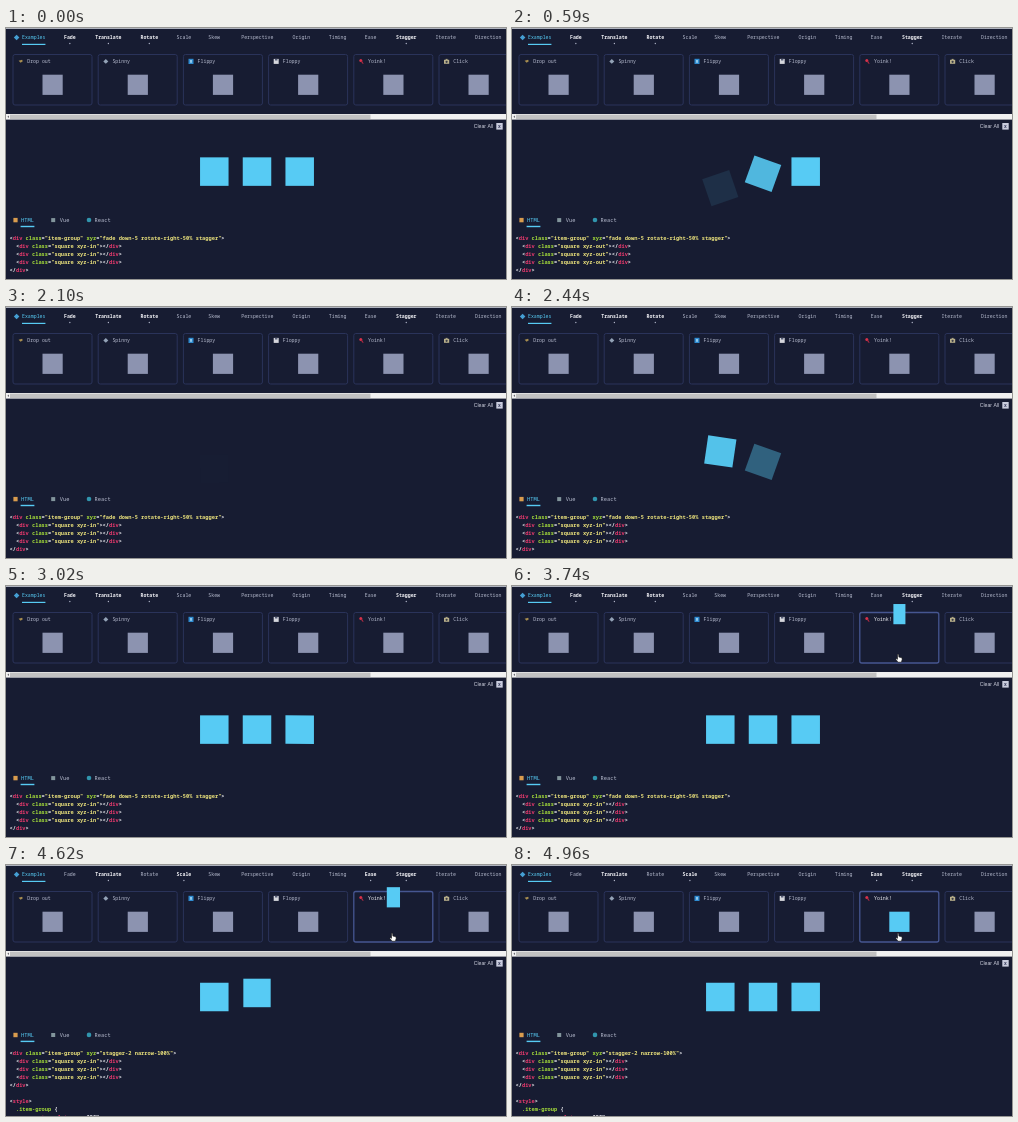
An HTML page with a canvas for the animation above (5 s loop, 500 px wide and 251 px high).

```html
<!DOCTYPE html>
<html lang="en">
<head>
<meta charset="utf-8">
<title>Animation playground</title>
<style>
  html, body { margin: 0; width: 100%; height: 100%; overflow: hidden; background: #171c32; }
  canvas { display: block; width: 500px; height: 251px; }
</style>
</head>
<body>
<canvas id="stage"></canvas>
<script>
const W = 500, H = 251, LOOP = 5000;
const MONO = '"Noto Sans Mono", "DejaVu Sans Mono", monospace';
const SANS = '"Liberation Sans", Arial, sans-serif';
const C = {
  bg: '#171c32', blue: '#57cbf4', grey: '#8c93b0', edge: '#2a335a', hover: '#465691',
  white: '#f4f4f8', dim: '#b8bdd0', red: '#ec3a6e', green: '#a4dc3a', yellow: '#ebe27c'
};

// Key times of the scene, in ms
const OUT = 170, IN = 2100, HOVER = 3390, CLICK = 4000;

// Entrance of one square, and the delay between neighbours
const ENTER = 475, STAGGER = 233;

const canvas = document.getElementById('stage');
const ctx = canvas.getContext('2d');
const dpr = window.devicePixelRatio || 1;
canvas.width = Math.round(W * dpr);
canvas.height = Math.round(H * dpr);

const clamp = v => Math.min(1, Math.max(0, v));
const mix = (a, b, p) => a + (b - a) * p;

// CSS "ease": cubic-bezier(.25, .1, .25, 1)
function ease(x) {
  x = clamp(x);
  if (x === 0 || x === 1) return x;
  const curve = (s, a, b) => 3 * (1 - s) * (1 - s) * s * a + 3 * (1 - s) * s * s * b + s * s * s;
  let lo = 0, hi = 1;
  for (let i = 0; i < 24; i++) {
    const mid = (lo + hi) / 2;
    if (curve(mid, 0.25, 0.25) < x) lo = mid; else hi = mid;
  }
  return curve(lo, 0.1, 1);
}
const easeBack = x => 1 - ease(1 - x);

function rect(x, y, w, h, color) {
  ctx.fillStyle = color;
  ctx.fillRect(x, y, w, h);
}

function dot(x, y, r, color) {
  ctx.fillStyle = color;
  ctx.beginPath();
  ctx.arc(x, y, r, 0, 7);
  ctx.fill();
}

function poly(points, color, line) {
  ctx.beginPath();
  for (let i = 0; i < points.length; i += 2) ctx.lineTo(points[i], points[i + 1]);
  ctx.closePath();
  ctx.fillStyle = color;
  ctx.fill();
  if (line) {
    ctx.strokeStyle = line;
    ctx.lineWidth = 0.6;
    ctx.stroke();
  }
}

// Laid out at ten times the size so tiny letters keep their exact advance
function text(str, x, y, size, color, weight = 500, font = MONO) {
  ctx.save();
  ctx.translate(x, y);
  ctx.scale(0.1, 0.1);
  ctx.font = `${weight} ${size * 10}px ${font}`;
  ctx.fillStyle = color;
  ctx.fillText(str, 0, 0);
  const width = ctx.measureText(str).width / 10;
  ctx.restore();
  return width;
}

function square(x, y, size, { angle = 0, alpha = 1, sx = 1, color = C.blue } = {}) {
  if (alpha <= 0 || sx <= 0) return;
  ctx.save();
  ctx.globalAlpha = alpha;
  ctx.translate(x, y);
  ctx.rotate(angle);
  ctx.scale(sx, 1);
  rect(-size / 2, -size / 2, size, size, color);
  ctx.restore();
}

function clip(y, h, draw) {
  ctx.save();
  ctx.beginPath();
  ctx.rect(0, y, W, h);
  ctx.clip();
  draw();
  ctx.restore();
}

const NAV = [
  ['Examples', 16], ['Fade', 58], ['Translate', 89.2], ['Rotate', 134.5], ['Scale', 170.6],
  ['Skew', 202.3], ['Perspective', 235.2], ['Origin', 286.6], ['Timing', 322.8],
  ['Ease', 358.8], ['Stagger', 390], ['Iterate', 429.4], ['Direction', 469]
];

function drawNav(t) {
  const active = t < CLICK ? ['Fade', 'Translate', 'Rotate', 'Stagger'] : ['Translate', 'Scale', 'Ease', 'Stagger'];
  rect(0, 0, W, 0.8, '#d4d7e0');
  square(10.6, 9.5, 3.9, { angle: Math.PI / 4, color: '#459fd3' });
  NAV.forEach(([label, x], i) => {
    const on = active.includes(label);
    const w = text(label, x, 11.3, 4.88, i ? (on ? C.white : C.dim) : C.blue, on ? 700 : 500);
    if (!i) rect(x, 15.8, w, 1.2, C.blue);
    if (on) dot(x + w / 2, 15.5, 0.65, C.dim);
  });
}

const CARDS = ['Drop out', 'Spinny', 'Flippy', 'Floppy', 'Yoink!', 'Click'];

const ICONS = [
  () => poly([-2, -0.6, 1.5, -1.6, 2.2, -0.2, 0, 1.3], '#a88e50'),
  () => poly([-2.5, 0, 0, -2.3, 2.5, 0, 0, 2.3], '#93a2b6'),
  () => { rect(-2.5, -2.6, 5, 5.2, '#2f8bd0'); rect(-0.8, -1.4, 1.6, 2.8, '#a8d8f2'); },
  () => { rect(-2.5, -2.5, 5, 5, '#d5d6dc'); rect(-1.2, -2.5, 2.4, 1.6, '#596079'); },
  () => { dot(-0.6, -1, 1.5, '#d8324a'); poly([-0.6, 0, 0.6, -0.6, 2.2, 2.4, 1.5, 2.6], '#b32b42'); },
  () => { rect(-2.6, -1.6, 5.2, 4, '#b9b08a'); rect(-1, -2.5, 2, 1, '#b9b08a'); dot(0, 0.4, 1.1, '#3b3d48'); }
];

// How far the hovered preview has been pulled away: 0 at rest, 1 gone
function yoink(t) {
  return t < 4440 ? easeBack((t - 3420) / 490) : 1 - ease((t - 4440) / ENTER);
}

function drawCards(t) {
  CARDS.forEach((label, i) => {
    const x = 7 + 85.2 * i;
    const over = i === 4 && t >= HOVER;
    ctx.strokeStyle = over ? C.hover : C.edge;
    ctx.lineWidth = over ? 1.3 : 1;
    ctx.beginPath();
    ctx.roundRect(x, 26.5, 79, 50.5, 2);
    ctx.stroke();
    ctx.save();
    ctx.translate(x + 7.6, 33.4);
    ICONS[i]();
    ctx.restore();
    text(label, x + 14.2, 35.3, 4.9, over ? C.white : C.dim);
    const p = over ? yoink(t) : 0;
    square(x + 39.6, 56.8 - 71 * p, 20.2, { sx: 1 - p, color: over ? C.blue : C.grey });
  });
}

function drawScrollbar() {
  rect(0, 86, W, 5.6, '#f1f1f1');
  rect(4, 86.6, 360.5, 4.4, '#c1c1c1');
  poly([1.4, 88.8, 3, 87.6, 3, 90], '#66666c');
}

function drawClear() {
  text('Clear All', 467.8, 100.2, 5.1, '#d4d6e3', 400, SANS);
  rect(490.3, 95, 6.4, 6.6, '#c9ccdd');
  text('x', 492, 99.8, 4.6, '#3a3f5e', 700);
}

function drawSquares(t) {
  const away = (start, i) => 1 - ease((t - start - STAGGER * i) / ENTER);
  for (let i = 0; i < 3; i++) {
    const x = 208.3 + 42.7 * i;
    if (t >= CLICK) {
      const q = away(CLICK + 33, i);
      square(x, 132 - 100 * q, 28.5, { sx: 1 - q });
    } else {
      const q = t < IN ? easeBack((t - OUT - 10 - 230 * i) / 460) : away(IN - 7, i);
      square(x, 143.6 + 18.5 * q, 28.5, { angle: Math.PI * q, alpha: 1 - q });
    }
  }
}

function drawTabs(y) {
  rect(7.4, y - 4, 4.2, 4.4, '#d99c4e');
  rect(45.2, y - 3.8, 4, 4, '#82959c');
  dot(83, y - 1.9, 2.3, '#3195ad');
  text('HTML', 15, y, 5.35, C.blue);
  text('Vue', 53.8, y, 5.35, C.dim);
  text('React', 88.6, y, 5.35, C.dim);
  rect(14.6, y + 3.9, 13.8, 1.4, C.blue);
}

// Groups: bracket, tag, attribute, selector, property, string
const TOKENS = /(<\/?)(\w+)|(\w+(?==")|\.[\w-]+)|(--[\w-]+)|("[^"]*")|\s+|./g;

function codeLine(line, x, y) {
  const put = (s, color) => { x += text(s, x, y, 5.35, color, 700); };
  for (const [all, bracket, tag, name, prop, string] of line.matchAll(TOKENS)) {
    if (tag) {
      put(bracket, C.white);
      put(tag, C.red);
    } else {
      put(all, name ? C.green : prop ? C.red : string ? C.yellow : C.white);
    }
  }
}

function drawCode(t) {
  const late = t >= CLICK;
  const mode = t >= OUT && t < IN ? 'out' : 'in';
  const xyz = late ? 'stagger-2 narrow-100%' : 'fade down-5 rotate-right-50% stagger';
  const child = `  <div class="square xyz-${mode}"></div>`;
  const lines = [`<div class="item-group" xyz="${xyz}">`, child, child, child, '</div>'];
  if (late) lines.push('', '<style>', '  .item-group {', '    --xyz-translate-y: -350%;');
  const top = late ? 189.6 : 212;
  lines.forEach((line, i) => codeLine(line, 3.5, top + 8.05 * i));
}

function drawPointer(t) {
  if (t < 3090) return;
  const p = ease((t - 3090) / 400);
  const y = mix(237, 68.3, p);
  ctx.save();
  ctx.translate(mix(460, 386, p), y);
  ctx.lineJoin = 'round';
  if (y > 77) {
    poly([0, 0, 0, 6.6, 1.6, 5.2, 2.7, 7.6, 3.7, 7.1, 2.7, 4.8, 4.7, 4.7], '#fff', '#111');
  } else {
    poly([-0.5, 0, 0.6, 0, 0.9, 2.8, 3.9, 3.4, 4.2, 5, 3.4, 7.9, 0, 7.9, -2.2, 4.9, -1.7, 4.2, -0.5, 5], '#fff', '#111');
  }
  ctx.restore();
}

function draw(t) {
  ctx.setTransform(dpr, 0, 0, dpr, 0, 0);
  rect(0, 0, W, H, C.bg);
  clip(18, 68, () => drawCards(t));
  drawNav(t);
  drawScrollbar();
  clip(92, 159, () => drawSquares(t));
  drawClear();
  drawTabs(t < CLICK ? 193.9 : 171.8);
  drawCode(t);
  drawPointer(t);
}

const start = performance.now();
function tick() {
  draw((performance.now() - start) % LOOP);
  requestAnimationFrame(tick);
}
tick();
</script>
</body>
</html>
```
